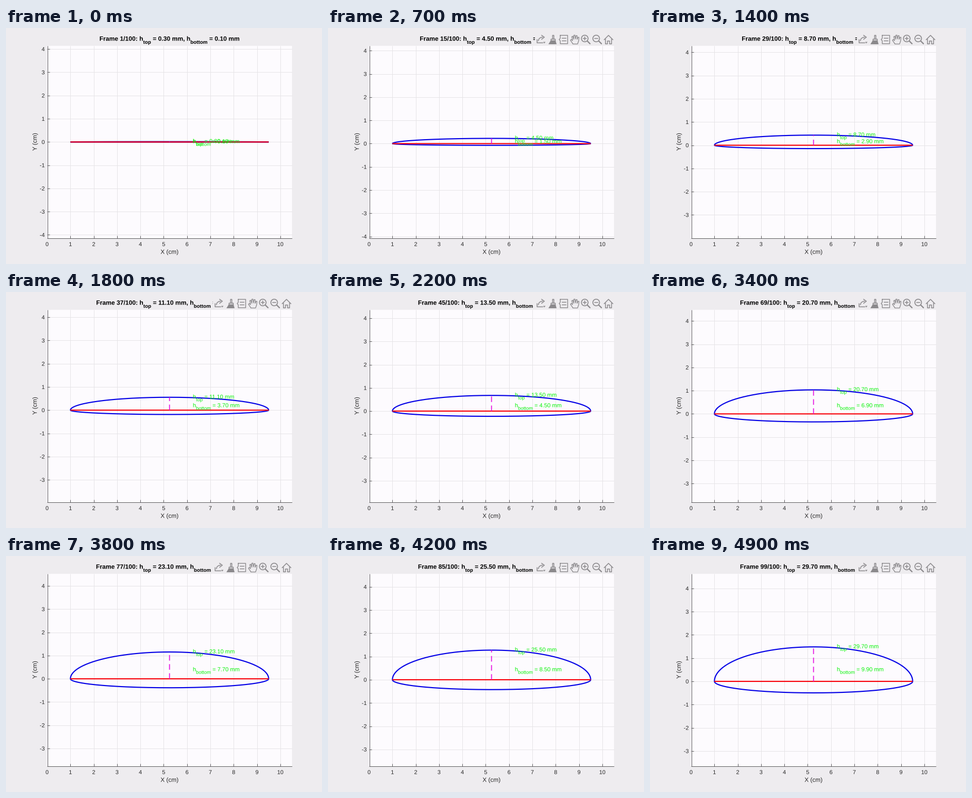
These frames come from a looping animation (600 by 450 pixels, 5000 ms). A matplotlib script:

```python
import numpy as np
import matplotlib.pyplot as plt
from matplotlib.animation import FuncAnimation
from matplotlib.patches import Circle, PathPatch, Polygon, Rectangle
from matplotlib.path import Path
from matplotlib.textpath import TextPath

W, H = 600, 450
FRAMES, INTERVAL = 50, 100
PX = 0.72  # points per pixel at 100 dpi

# Plot box in pixels (y grows downwards) and data scale
LEFT, RIGHT, TOP, BOTTOM = 78, 543, 33.75, 400.5
UNIT = (RIGHT - LEFT) / 10.5
MIDDLE = (TOP + BOTTOM) / 2
CHORD_MID, CHORD_HALF = 5.25, 4.25

BACK, PAPER = "#eeecef", "#fdfbfe"
GRID, AXIS, INK = "#e6e4e7", "#5c5b5d", "#262626"
BLUE, RED, MAGENTA, GREEN = "#0400e6", "#f8000a", "#e612e0", "#08f408"
ICON = "#8b898c"

fig = plt.figure(figsize=(6, 4.5), dpi=100, facecolor=BACK)
ax = fig.add_axes([0, 0, 1, 1])
ax.set_xlim(0, W)
ax.set_ylim(H, 0)
ax.axis("off")


def sx(x):
    return LEFT + UNIT * x


def line(xs, ys, color, width=1.0, z=2, **kw):
    kw = {"solid_capstyle": "butt", "dash_capstyle": "butt", **kw}
    return ax.plot(xs, ys, color=color, lw=width * PX, zorder=z, **kw)[0]


def glyphs(text, size, weight):
    font = {"family": "Liberation Sans", "weight": weight}
    return TextPath((0, 0), text, size=size, prop=font)


def advance(text, size, weight):
    def right(s):
        return glyphs(s, size, weight).vertices[:, 0].max()
    return right("|" + text + "|") - right("||")


def text_path(parts, x, y, size, weight="normal", align=0.0, sub=0.85,
              drop=5.0, upright=False):
    """Outline of a label; every second part is a subscript."""
    pieces, pen = [], 0.0
    for i, part in enumerate(parts):
        scale, shift = (sub, drop) if i % 2 else (1.0, 0.0)
        piece = glyphs(part, size * scale, weight)
        pieces.append(Path(piece.vertices * [1, -1] + [pen, shift], piece.codes))
        pen += advance(part, size * scale, weight)
    whole = Path.make_compound_path(*pieces)
    verts = whole.vertices - [pen * align, 0]
    if upright:
        verts = np.column_stack([verts[:, 1], -verts[:, 0]])
    return Path(verts + [x, y], whole.codes)


def label(parts, x, y, size, color=INK, z=6, **kw):
    patch = PathPatch(text_path(parts, x, y, size, **kw), fc=color, lw=0, zorder=z)
    return ax.add_patch(patch)


def draw_toolbar():
    z = 9
    items = [ax.add_patch(Rectangle((393, 9), 150.5, 24.2, fc=BACK, lw=0, zorder=8))]

    def stroke(points, width=1.5):
        xs, ys = zip(*points)
        items.append(line(xs, ys, ICON, width, z, solid_capstyle="round",
                          solid_joinstyle="round", snap=False))

    def fill(points):
        items.append(ax.add_patch(Polygon(points, fc=ICON, lw=0, zorder=z)))

    def ring(x, y, r):
        items.append(ax.add_patch(Circle((x, y), r, fill=False, ec=ICON,
                                         lw=1.6 * PX, zorder=z)))

    # Export
    stroke([(397, 22), (397, 28.3), (408, 28.3)])
    bend = np.linspace(0, np.pi / 2, 10)
    stroke([(399.5 + 8 * (1 - np.cos(t)), 24.5 - 7 * np.sin(t)) for t in bend])
    stroke([(405.5, 13.8), (410.8, 17.6), (405.5, 21.6)])
    fill([(408.5, 26.5), (413, 26.5), (410.7, 29.5)])

    # Brush
    stroke([(426.4, 21), (426.4, 14), (428.8, 14), (428.8, 21)])
    stroke([(423.5, 24.5), (423.5, 21.3), (431.5, 21.3), (431.5, 24.5)])
    fill([(423, 23.5), (432, 23.5), (434, 31), (418.5, 31)])

    # Data tip
    stroke([(441, 14), (455, 14), (455, 30), (441, 30), (441, 24.5),
            (439, 22), (441, 19.5), (441, 14)], 1.4)
    stroke([(444.5, 19.5), (452, 19.5)])
    stroke([(444.5, 24.5), (452, 24.5)])

    # Hand
    stroke([(465.2, 30.5), (460.4, 23.5), (461.8, 21.8), (464.4, 24), (463, 16.5),
            (464.8, 15.6), (466.6, 21.5), (466.6, 14), (468.6, 13.4), (469.8, 21),
            (471, 14.4), (472.9, 14.6), (473, 21.6), (474.9, 17.4), (476.6, 18),
            (475.8, 25), (473.8, 30.5), (465.2, 30.5)], 1.3)

    # Zoom in and out
    for x in (487.5, 509.2):
        ring(x, 20, 6.3)
        stroke([(x + 4.8, 24.8), (x + 10, 30)], 2.2)
        stroke([(x - 3.2, 20), (x + 3.2, 20)])
    stroke([(487.5, 16.8), (487.5, 23.2)])

    # Home
    stroke([(524.3, 22.4), (532.6, 14), (541, 22.4)])
    stroke([(526.8, 21), (526.8, 30.3), (530.6, 30.3), (530.6, 24.8),
            (534.6, 24.8), (534.6, 30.3), (538.4, 30.3), (538.4, 21)])
    return items


# Static parts
ax.add_patch(Rectangle((LEFT, TOP), RIGHT - LEFT, BOTTOM - TOP, fc=PAPER, lw=0, zorder=0))
for n in range(11):
    if n:
        line([sx(n)] * 2, [TOP, BOTTOM], GRID, z=1)
        line([sx(n)] * 2, [BOTTOM, BOTTOM - 4.65], AXIS)
    label([str(n)], sx(n), 415.8, 10.75, align=0.5)
line([LEFT + 0.5] * 2, [TOP, BOTTOM + 0.5], AXIS)
line([LEFT, RIGHT], [BOTTOM] * 2, AXIS)
label(["X (cm)"], sx(CHORD_MID), 430.6, 11.6, align=0.5)
label(["Y (cm)"], 58.4, MIDDLE, 11.6, align=0.5, upright=True)

# Moving parts
rows = [(v, line([], [], GRID, z=1), line([], [], AXIS), label([str(v)], 0, 0, 10.75))
        for v in range(-4, 5)]
outlines = [line([], [], BLUE, 2.15, 3, snap=False) for _ in range(2)]
chord = line([], [], RED, 2.15, 4, snap=False)
height = line([], [], MAGENTA, 1.7, 5, snap=False, linestyle=(0, (6.25, 3.95)))
top_note = label(["h"], 0, 0, 10.85, GREEN, 7)
bottom_note = label(["h"], 0, 0, 10.85, GREEN, 7)
title = label(["F"], 0, 0, 11.85, "black", 7)
toolbar = draw_toolbar()

angle = np.linspace(np.pi, 0, 161)
profile_x = sx(CHORD_MID + CHORD_HALF * np.cos(angle))
profile_y = np.sin(angle)


def update(i):
    step = 2 * i + 1
    top_mm, bottom_mm = 0.3 * step, 0.1 * step
    rise, sag = top_mm / 20 * UNIT, bottom_mm / 20 * UNIT
    zero = MIDDLE + (rise - sag) / 2  # the view stays centred on the shape

    for value, grid, tick, number in rows:
        y = zero - value * UNIT
        shown = TOP < y < BOTTOM
        grid.set_data([LEFT + 1, RIGHT], [y, y])
        tick.set_data([LEFT, LEFT + 4.65], [y, y])
        number.set_path(text_path([str(value)], 73.6, y + 3.8, 10.75, align=1.0))
        for part in (grid, tick, number):
            part.set_visible(shown)

    outlines[0].set_data(profile_x, zero - rise * profile_y)
    outlines[1].set_data(profile_x, zero + sag * profile_y)
    chord.set_data([profile_x[0], profile_x[-1]], [zero, zero])
    height.set_data([sx(CHORD_MID)] * 2, [zero, zero - rise])

    note_x = sx(CHORD_MID + 1)
    top_note.set_path(text_path(["h", "top", f" = {top_mm:.2f} mm"],
                                note_x, zero - rise + 2.6, 10.85))
    bottom_note.set_path(text_path(["h", "bottom", f" = {bottom_mm:.2f} mm"],
                                   note_x, MIDDLE + 2.6, 10.85))
    title.set_path(text_path(
        [f"Frame {step}/100: h", "top", f" = {top_mm:.2f} mm, h",
         "bottom", f" = {bottom_mm:.2f} mm"],
        sx(CHORD_MID), 24.3, 11.85, weight="bold", align=0.5, sub=0.81, drop=5.8))
    for item in toolbar:
        item.set_visible(i > 0)
    return []


anim = FuncAnimation(fig, update, frames=FRAMES, interval=INTERVAL,
                     init_func=lambda: update(0), repeat=True)
plt.show()
```
